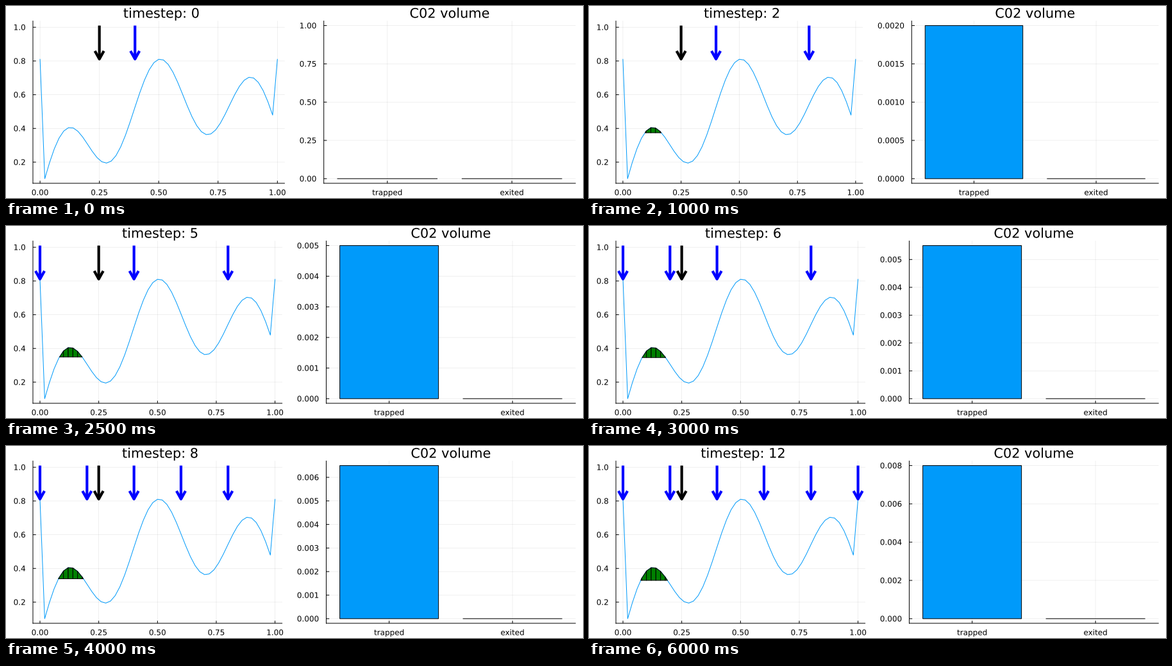
Write a matplotlib script that moves like this. It is 900x300 px and loops after 6500 ms.

```python
import numpy as np
import matplotlib.pyplot as plt
from matplotlib.animation import FuncAnimation
from matplotlib.patches import PathPatch
from matplotlib.path import Path
from matplotlib.textpath import TextPath

W, H, DPI = 900, 300, 100
STEPS, STEP_MS = 13, 500
PT = 72 / DPI                      # points per pixel
TITLE, LABEL = 20.85, 12           # font sizes in pixels
TOP, BOTTOM = 23.4, 277.0          # vertical extent of both panels
LEFT, RIGHT = 42.0, 888.2
PAD = 0.03
BLUE, GREEN = "#009afa", "#008000"
LINE = 1.0

INJECTOR = 0.25
WELLS = [0.4, 0.8, 0.0, 0.2, 0.6, 1.0]   # one more every second step
POROSITY = 0.7

plt.rcParams["font.family"] = "DejaVu Sans"
plt.rcParams["path.snap"] = False

# Top surface: lobes, a central dome and a tilt, closed off at both ends
X = np.linspace(0, 1, 51)
SURF = 0.2255 * np.sin(5 * np.pi * X) + 0.388 * np.sin(np.pi * X) + 0.393 * X
PEAK = SURF.max()
SURF[[0, -1]] = PEAK
DOME = slice(1, 15)                # cells around the first trap

fig = plt.figure(figsize=(W / DPI, H / DPI), dpi=DPI, facecolor="white")
ax = fig.add_axes([0, 0, 1, 1])


def scale(lo, hi, a, b):
    """Linear map from data range lo..hi to pixels a..b."""
    return lambda v: a + (np.asarray(v) - lo) / (hi - lo) * (b - a)


def padded(lo, hi):
    d = PAD * (hi - lo)
    return lo - d, hi + d


def line(x, y, color="black", width=LINE, **kw):
    ax.plot(x, y, color=color, lw=width * PT, **kw)


def text(x, y, s, size, align=0.5):
    """Filled glyph outlines at sub-pixel positions, aligned by advance."""
    def right_edge(t):
        return TextPath((0, 0), t, size=size).get_extents().x1
    advance = right_edge(s + ".") - right_edge(".")
    glyphs = TextPath((0, 0), s, size=size)
    verts = glyphs.vertices * [1, -1] + [x - align * advance, y]
    ax.add_patch(PathPatch(Path(verts, glyphs.codes), fc="black", lw=0))


def panel(x0, x1, xs, xlabels, ys, ylabels):
    """Grid, spines, inward ticks and tick labels."""
    for x, s in zip(xs, xlabels):
        line([x, x], [TOP, BOTTOM], alpha=0.1, width=0.6)
        line([x, x], [BOTTOM, BOTTOM - 4], solid_capstyle="butt")
        text(x, 295.5, s, LABEL)
    for y, s in zip(ys, ylabels):
        line([x0, x1], [y, y], alpha=0.1, width=0.6)
        line([x0, x0 + 4.7], [y, y], solid_capstyle="butt")
        text(x0 - 11.3, y + 4.35, s, LABEL, align=1)
    line([x0, x1], [BOTTOM, BOTTOM])
    line([x0, x0], [TOP, BOTTOM])


def arrow(x, y0, y1, color):
    line([x, x], [y0, y1], color, 4.2, solid_capstyle="butt")
    line([x - 7, x, x + 7], [y1 - 13, y1 - 0.4, y1 - 13], color, 4.2,
         solid_capstyle="butt", solid_joinstyle="round")


def trap_cells(level):
    """Polygons between the dome and a flat level, one per mesh cell."""
    xs, hs = X[DOME], SURF[DOME] - level
    cells = []
    for xa, xb, ha, hb in zip(xs, xs[1:], hs, hs[1:]):
        if max(ha, hb) <= 0:
            continue
        cross = xa + (xb - xa) * ha / (ha - hb) if ha * hb < 0 else None
        if ha < 0:
            xa, ha = cross, 0
        if hb < 0:
            xb, hb = cross, 0
        cells.append((xa, xb, ha, hb))
    return cells


def trap_level(area):
    lo, hi = 0.25, SURF[DOME].max()
    for _ in range(40):
        mid = (lo + hi) / 2
        filled = sum((b - a) * (p + q) / 2 for a, b, p, q in trap_cells(mid))
        lo, hi = (mid, hi) if filled > area else (lo, mid)
    return lo


def trapped_volume(step):
    """Full rate for five steps, then half rate until injection stops."""
    return 0.001 * min(step, 5) + 0.0005 * min(max(step - 5, 0), 6)


def volume_ticks(step):
    if step == 0:
        return 0.25, 2
    if step == 1:
        return 0.00025, 5
    if step == 2:
        return 0.0005, 4
    return (0.001 if step < 9 else 0.002), 3


def draw_section(step, x1, volume):
    sx = scale(*padded(0, 1), LEFT, x1)
    sy = scale(*padded(SURF.min(), PEAK + 0.2), BOTTOM, TOP)
    xt, yt = np.arange(5) / 4, np.arange(1, 6) / 5
    panel(LEFT, x1, sx(xt), [f"{v:.2f}" for v in xt],
          sy(yt), [f"{v:.1f}" for v in yt])
    line(sx(X), sy(SURF), BLUE)

    if volume > 0:
        level = trap_level(POROSITY * volume)
        for xa, xb, ha, hb in trap_cells(level):
            ax.fill(sx([xa, xa, xb, xb]),
                    sy([level, level + ha, level + hb, level]),
                    fc=GREEN, ec="black", lw=LINE * PT, joinstyle="round",
                    zorder=3)

    y0, y1 = sy(PEAK + 0.2), sy(PEAK)
    arrow(sx(INJECTOR), y0, y1, "black")
    for well in WELLS[:step // 2 + 1]:
        arrow(sx(well), y0, y1, "blue")
    text((LEFT + x1) / 2 + 4.2, 18.4, f"timestep: {step}", TITLE)


def draw_bars(x0, volume, tick, decimals):
    top = volume or 1.0
    sx = scale(-0.01, 2.01, x0, RIGHT)
    sy = scale(*padded(0, top), BOTTOM, TOP)
    yt = np.arange(int(top / tick + 1e-6) + 1) * tick
    panel(x0, RIGHT, sx([0.5, 1.5]), ["trapped", "exited"],
          sy(yt), [f"{v:.{decimals}f}" for v in yt])
    for mid, v in ((0.5, volume), (1.5, 0)):
        a, b = sx(mid - 0.4), sx(mid + 0.4)
        if v > 0:
            ax.fill([a, a, b, b], sy([0, v, v, 0]), fc=BLUE, ec="black",
                    lw=LINE * PT, zorder=3)
        else:
            line([a, b], [sy(0), sy(0)], zorder=3)
    text((x0 + RIGHT) / 2, 18.4, "C02 volume", TITLE)


def draw(step):
    ax.clear()
    ax.set(xlim=(0, W), ylim=(H, 0))
    ax.axis("off")
    volume = trapped_volume(step)
    tick, decimals = volume_ticks(step)
    # Longer labels squeeze both panels equally
    squeeze = 3.8 * (decimals - 2)
    draw_section(step, 434.4 - squeeze, volume)
    draw_bars(495.7 + squeeze, volume, tick, decimals)
    return []


anim = FuncAnimation(fig, draw, frames=STEPS, interval=STEP_MS,
                     init_func=lambda: [], repeat=True, repeat_delay=0)
plt.show()
```
